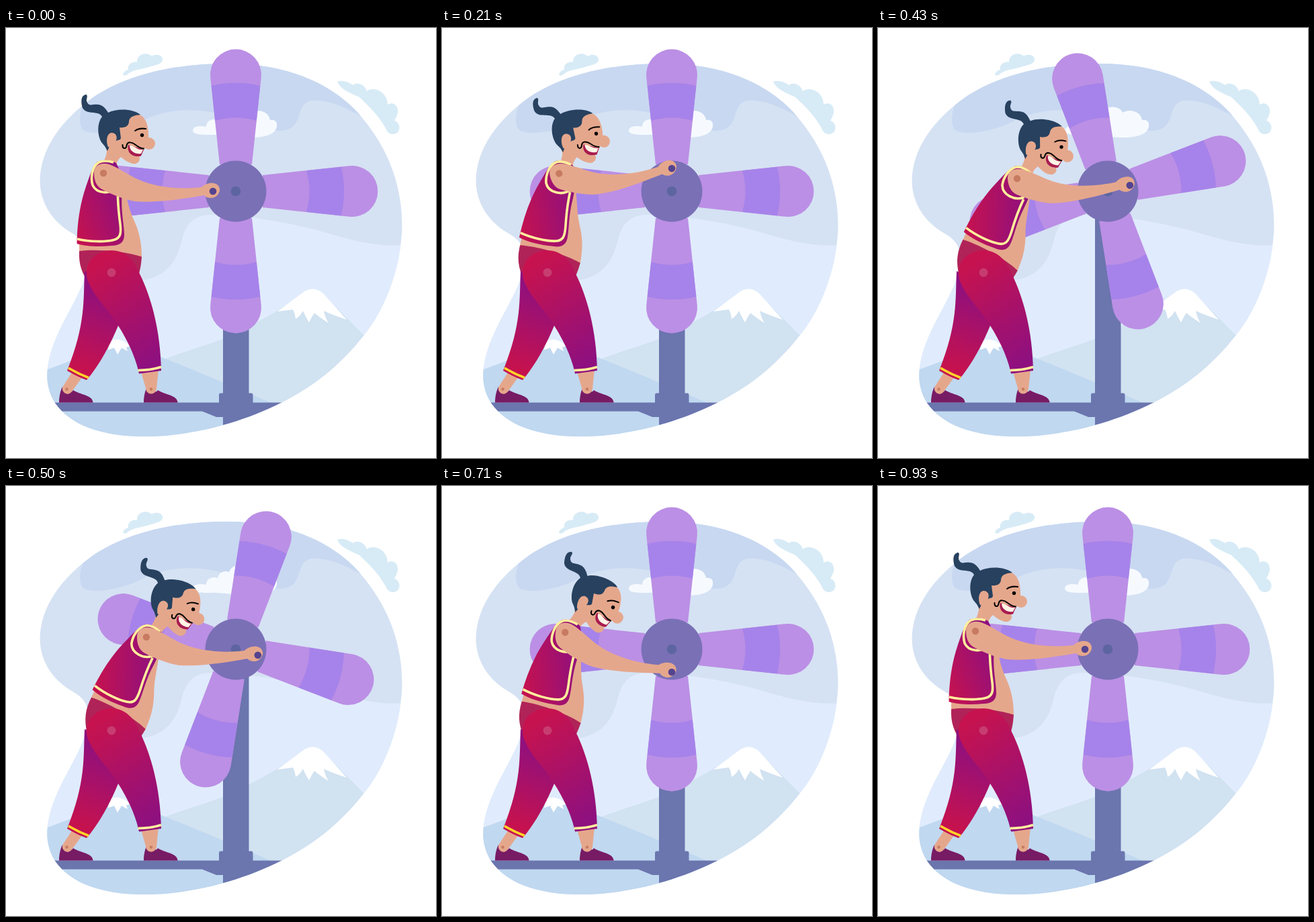
Write an HTML page without scripts that moves like this. It is 640 px wide and 640 px high and loops after 1000 ms.

```html
<!DOCTYPE html>
<html lang="en">
<head>
<meta charset="utf-8">
<title>Wind turbine</title>
<style>
html,body{margin:0;height:100%;overflow:hidden;background:#fff}
svg{display:block;width:100vw;height:100vh;animation:pose 1s step-end infinite}
.spin{transform-origin:342px 243px;transform:rotate(var(--p))}
.torso{transform-origin:157px 364px;transform:rotate(var(--t))}
.head{transform-origin:151px 206px;transform:rotate(var(--h))}
.arm{transform-origin:145px 216px;transform:rotate(var(--a))}
.skin{fill:#e5a78c}
.hair{fill:#27415f}
.steel{fill:#6b75ae}
.line{fill:none;stroke-linecap:round}
.trim{fill:none;stroke:#fff09c;stroke-width:3.6}
/* p: propeller, t: torso, h: head, a: arm */
@keyframes pose{
0%{--p:0deg;--t:0deg;--h:0deg;--a:0deg}
7%{--p:30deg;--t:1.2deg;--h:-5deg;--a:-7.1deg}
14%{--p:60deg;--t:5.2deg;--h:-10.7deg;--a:-15.3deg}
21%{--p:90deg;--t:11.3deg;--h:-16.1deg;--a:-23.3deg}
29%{--p:120deg;--t:17.9deg;--h:-19.7deg;--a:-29.3deg}
36%{--p:150deg;--t:23deg;--h:-19.7deg;--a:-31.5deg}
43%{--p:165deg;--t:24.3deg;--h:-17.8deg;--a:-30.5deg}
50%{--p:195deg;--t:25.1deg;--h:-13.1deg;--a:-25.4deg}
57%{--p:210deg;--t:24.4deg;--h:-9.8deg;--a:-21.6deg}
64%{--p:240deg;--t:20.7deg;--h:-2.3deg;--a:-12.9deg}
71%{--p:270deg;--t:14.8deg;--h:2.5deg;--a:-3.8deg}
79%{--p:300deg;--t:8.5deg;--h:4.4deg;--a:1.6deg}
86%{--p:330deg;--t:2.9deg;--h:3.7deg;--a:3.1deg}
93%,100%{--p:360deg;--t:0deg;--h:0deg;--a:0deg}
}
</style>
</head>
<body>
<svg viewBox="0 0 640 640" xmlns="http://www.w3.org/2000/svg">
<defs>
<clipPath id="blob"><path d="M330 53C440 53 500 98 527 130C570 180 590 235 589.500 298C587 365 560 425 532 458C495 505 455 535 409 558C345 590 270 608 207 608C140 608 95 590 73 558C58 534 59 510 67 482C78 446 100 414 113 384C122 362 125 340 119 325C112 312 104 309 96 304C70 288 51 262 50.500 228C51 180 82 137 130 103C185 67 255 53 330 53Z"/></clipPath>
<linearGradient id="vest" x1="0" y1=".9" x2=".9" y2=".25"><stop offset="0" stop-color="#c5124f"/><stop offset="1" stop-color="#8e107f"/></linearGradient>
<linearGradient id="front" gradientUnits="userSpaceOnUse" x1="140" y1="350" x2="232" y2="488"><stop offset="0" stop-color="#c6134f"/><stop offset="1" stop-color="#8e107f"/></linearGradient>
<linearGradient id="back" gradientUnits="userSpaceOnUse" x1="146" y1="385" x2="100" y2="500"><stop offset="0" stop-color="#8e107f"/><stop offset="1" stop-color="#c5124f"/></linearGradient>
<g id="blade">
<path fill="#bb8fe5" d="M-24-40L-37.800-169.500A38 38 0 1 1 37.800-169.500L24-40Z"/>
<path fill="#a683ea" d="M-36.300-157A161 161 0 0 1 36.300-157L30.800-105A109 109 0 0 0-30.800-105Z"/>
</g>
<path id="shoe" fill="#781b65" d="M84 534C85 541 98 544 100 539C110 546 129 546 129.500 557.500H79C79 548 81 540 84 534Z"/>
</defs>

<g fill="#d7ebf6">
<path d="M174 70C175 65 178 63 182 62C180 55 188 49 195 51C194 40 208 34 217 42C224 37 234 41 233 48C232 53 224 55 216 57C202 62 187 62 181 69Q177 72 174 70Z"/>
<path d="M493 80C499 77 511 80 516 85C523 80 534 84 537 94C547 86 568 95 568 114C579 108 586 119 582 130C580 134 579 136 578 138C586 140 588 151 582 156C574 161 567 156 565 149C554 130 541 117 526 103C514 97 498 92 493 80Z"/>
</g>

<g clip-path="url(#blob)">
<path fill="#d5e2f3" d="M0 0H640V640H0Z"/>
<path fill="#c8d8f1" d="M120 100C108 126 108 142 114 151C128 162 172 153 195 142C228 124 265 118 305 125C345 132 375 154 410 153C446 150 428 113 455 108C480 106 505 118 535 135V0H100Z"/>
<path fill="#e0ecfd" d="M50 372L118 345C150 374 190 378 211 374C240 366 254 348 262 315C268 290 282 278 305 278C370 280 410 288 460 300C510 314 545 327 600 323V640H40Z"/>
<path fill="#f6faff" d="M278 153C278 146 289 145 298 147C298 138 307 134 315 137C317 128 325 125 332 128C337 114 360 115 364 126C375 119 392 125 393 137C401 136 404 140 403 147C401 158 386 163 365 163C340 163 320 158 306 159C292 159 279 159 278 153Z"/>
<path fill="#d1e2f1" d="M200 508C260 480 310 471 340 455C380 435 410 420 440 395Q457 381 472 396L545 470V600H200Z"/>
<path fill="#fff" d="M404 422L440 395Q457 381 473 396L507 434Q488 428 473 421Q475 431 480 439Q467 431 459 424Q455 430 451 438Q445 428 442 421Q438 429 431 433Q430 424 427 419Z"/>
<path fill="#c0d8f0" d="M50 512C90 499 125 484 150 469Q165 458 180 469C210 482 250 496 395 558L330 640H40Z"/>
<path fill="#fff" d="M144 473L150 469Q165 458 180 469L189 473L179 475L181 481L172 476L166 486L161 476L152 479L153 473Z"/>
<path class="steel" d="M50 557.500H430V640H323V579H313L292 570.500H50Z"/>
</g>

<path class="steel" d="M323 243H361.500V543.500H365Q367.500 543.500 367.500 546V558H317V546Q317 543.500 319.500 543.500H323Z"/>
<g class="spin">
<g transform="translate(342 243)">
<use href="#blade"/><use href="#blade" transform="rotate(90)"/><use href="#blade" transform="rotate(180)"/><use href="#blade" transform="rotate(270)"/>
</g>
</g>
<circle cx="342" cy="243" r="45.500" fill="#7a70b6"/>
<circle cx="342" cy="243" r="7.300" fill="#5d65a1"/>

<use href="#shoe"/><use href="#shoe" x="126"/>
<g class="skin">
<path d="M100 510L85 533A7.500 7.500 0 0 0 98 541L114 519Z"/>
<path d="M200 508L208 536A8 8 0 0 0 224 537L227 508Z"/>
</g>
<g fill="#c77b60"><circle cx="90.500" cy="537.500" r="2.200"/><circle cx="216" cy="537.500" r="2.200"/></g>

<g class="torso">
<g class="head">
<path class="skin" d="M146 165L150 184Q149 193 142 204L163 207Q165 197 171 192C178 198 186 203 193 202C199 200 200 195 198 190L205 182L212 170C213 152 211 135 199 129L165 128Z"/>
<circle class="skin" cx="213" cy="172" r="9"/>
<path class="hair" d="M119.500 99C110 100 112 113 114 119C120 130 138 122 143 132C135 142 136 160 142 170Q148 176 151 183L156 172L166 167Q170 167 171 164L169 148C177 149 183 146 183 139C184 131 192 130 200 129C190 120 165 119 152 126C148 119 143 114 137 114C129 113 124 117 121 111C118 106 123 102 119.500 99Z"/>
<path class="skin" d="M152 177C149 170 149 157 157 156C164 156 166 162 164 167C163 174 158 179 152 177Z"/>
<path fill="#a81c50" d="M182 174C179 187 190 193 201 190.500L205 181Z"/>
<path fill="#fff4e6" d="M184 175C184 184 193 188 201 187L204 181C194 182 191 174 184 175Z"/>
<g class="line" stroke="#000" stroke-width="2"><path d="M173.500 174C173 180 179 181 179.500 175C181 168 188 170 193 174Q199 179 205 179.500"/><path d="M192 153Q198 148.500 208 150"/></g>
<circle cx="202.500" cy="159.500" r="2.700"/>
</g>
<path class="skin" d="M140 205L164 205C178 240 180 262 189 283C198 302 202 318 202 342L109 337V318Z"/>
<path fill="#b02358" d="M109 332C130 329 175 331 202 340.500C201 354 199 366 193 379C178 394 143 394 125 382C113 366 108 352 109 332Z"/>
<path fill="url(#vest)" d="M136 199Q150 193 164 201C172 215 173 235 172.500 250C171 275 176 293 176 308C176 319 169 324 157 324C138 326 118 325 105.500 321C106 290 110 262 119 236C125 219 128 207 136 199Z"/>
<path class="trim" d="M106 314C125 318.500 148 318.500 160 315.500C171 313 171.500 305 170 292C167 270 166 258 166.500 240"/>
<path class="trim" d="M160 200Q147 196 138 200C127 207 126 224 129 234C135 247 155 248 166 237"/>
<g class="arm">
<path class="skin" d="M131 216C131 204 142 199 154 203C168 208 182 219 198 226C228 239 264 240 291 237C295 233 302 230 309 231C317 232 320 240 317 245C315 250 310 253 305 253C301 253 298 252 295 249C265 254 225 261 192 258C175 255 155 247 141 239C134 234 131 226 131 216Z"/>
<circle cx="145" cy="216" r="5.200" fill="#c77b60"/>
</g>
</g>

<path fill="url(#back)" d="M117 362C115 405 119 440 91 510Q106 519 120 524C140 500 155 472 167 443L160 375Z"/>
<path fill="url(#front)" d="M120 362C121 343 138 331 157 331C178 331 192 347 199 366C216 400 230 450 231 510L198 514.500C193 490 181 465 167 443C152 418 134 403 125 383Q119 372 120 362Z"/>
<path class="trim" style="stroke:#ffd42a" d="M93 506Q108 515 123 520.500"/>
<path class="trim" d="M196.500 509.500Q215 509.500 231 504.500"/>
<circle cx="157" cy="364" r="6.500" fill="#c73d70"/>
<circle class="spin" cx="308" cy="243" r="5.300" fill="#54438f"/>
</svg>
</body>
</html>
```
